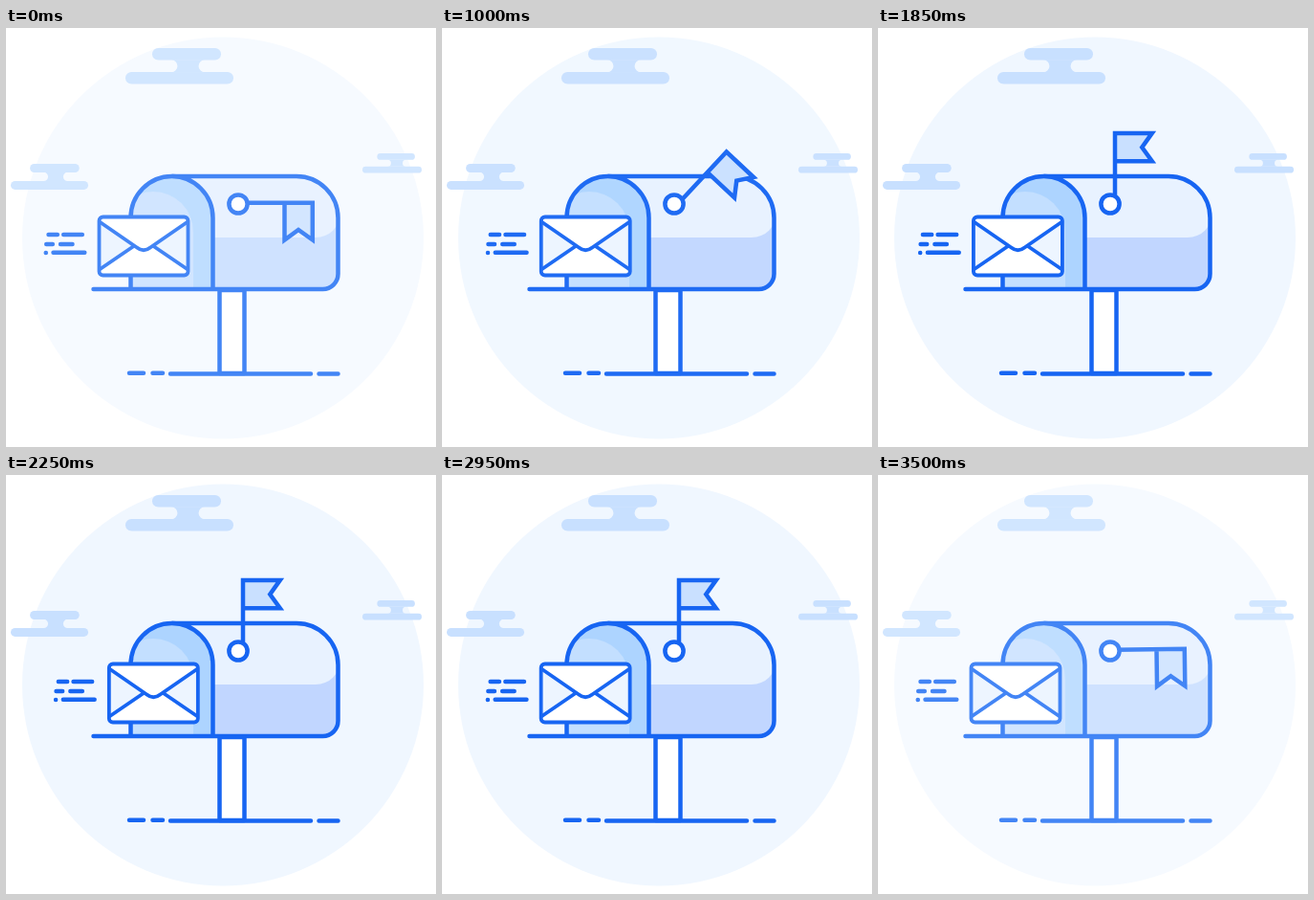
An HTML page for the animation above (3.55 s loop, 450 px wide and 438 px high).

```html
<!DOCTYPE html>
<html lang="en">
<head>
<meta charset="utf-8">
<title>Mailbox</title>
<style>
  html, body { margin: 0; width: 100%; height: 100%; overflow: hidden; background: #fff; }
  svg { display: block; width: 100%; height: 100%; }
  .line { fill: none; stroke: var(--line); stroke-width: 4.5; stroke-linecap: round; stroke-linejoin: round; }
  .paper { fill: #fff; }
  .sky { fill: var(--sky); }
  .cloud { fill: var(--cloud); }
  .shade { fill: var(--shade); }
  .light { fill: var(--light); }
  .rim { fill: var(--rim); }
  .inner { fill: var(--inner); }
  .cloth { fill: var(--cloth); }
  .side { fill: #edf5ff; }
</style>
</head>
<body>
<svg viewBox="0 0 450 438">
  <defs>
    <g id="cloud">
      <rect x="28" width="72" height="12.5" rx="6.25"/>
      <rect y="25" width="113" height="12.5" rx="6.25"/>
      <path d="M48 12.3a6.4 6.4 0 0 1 0 12.9h35a6.4 6.4 0 0 1 0-12.9z"/>
    </g>
    <path id="front" d="M130.5 273V198.5a43 43.5 0 0 1 86 0V273z"/>
    <path id="body" d="M174 155H304a43.5 43.5 0 0 1 43.5 43.5V257a16 16 0 0 1-16 16H216V198.5a43 43.5 0 0 0-42-43.5z"/>
    <clipPath id="frontClip"><use href="#front"/></clipPath>
    <clipPath id="bodyClip"><use href="#body"/></clipPath>
  </defs>

  <circle class="sky" cx="227" cy="219.5" r="210"/>
  <g class="cloud">
    <use href="#cloud" transform="translate(125 21)"/>
    <use href="#cloud" transform="translate(5 142) scale(.717)"/>
    <use href="#cloud" transform="translate(373 131) scale(.549)"/>
  </g>

  <path class="line" d="M129 360.8h15M153.500 360.800h10.500M172 361.500H319M327.500 361.500h20"/>
  <rect class="line paper" style="fill:#fff" x="223.500" y="274" width="26" height="87"/>

  <use href="#body" class="shade"/>
  <path class="light" clip-path="url(#bodyClip)" d="M170 150H350V193a26 26 0 0 1-26 26H170z"/>
  <use href="#front" class="rim"/>
  <path class="inner" clip-path="url(#frontClip)" d="M112 273V213a42 42 0 0 1 84 0V273z"/>
  <path class="line" d="M174 155H304a43.500 43.500 0 0 1 43.500 43.500V257a16 16 0 0 1-16 16H91.500M130.500 273V198.500a43 43.500 0 0 1 86 0V273"/>

  <g id="flag">
    <path class="line cloth" style="fill:var(--cloth);stroke-linejoin:miter;stroke-linecap:butt"
      d="M248 182.700H320.800V221.500L306 211L291.500 221.500V182.700"/>
  </g>
  <circle class="line" style="fill:#fff" cx="243" cy="184" r="9.600"/>

  <g id="mail">
    <path class="line" d="M44.500 216h9.300M60.200 216h19.600M42.200 226h6.600M57 226h12.500M41.700 235h.1M49.500 234.800h32.800"/>
    <rect class="paper" x="97.500" y="197.500" width="93" height="61" rx="4"/>
    <path class="side" d="M98 203L134 228L98 252zM190 203L154 228L190 252z"/>
    <g class="line" style="stroke-width:3.800">
      <rect x="97.500" y="197.500" width="93" height="61" rx="4"/>
      <path d="M98.500 203L137 229.500q7 5.500 14 0L189.500 203M98.500 252L133 228.500M189.500 252L155 228.500"/>
    </g>
  </g>
</svg>

<script>
  const LOOP = 3550, START = 795, SWING = 590, REACH = 23, RESET = 3175;
  const FLAG_TIME = 328, TINT_TIME = 250;

  // rest colour, active colour
  const tints = {
    line: ['#4385f5', '#1765f2'],
    sky: ['#f6faff', '#f0f7ff'],
    cloud: ['#d1e6ff', '#c8e0ff'],
    shade: ['#cfe2ff', '#c1d6ff'],
    light: ['#e9f2ff', '#e8f2ff'],
    rim: ['#bfdeff', '#add4ff'],
    inner: ['#d1e5ff', '#c3dfff'],
    cloth: ['#d3e6ff', '#c9e0ff']
  };
  const flag = document.getElementById('flag');
  const mail = document.getElementById('mail');
  const rootStyle = document.documentElement.style;

  const clamp = v => Math.min(1, Math.max(0, v));
  const channels = hex => [1, 3, 5].map(i => parseInt(hex.slice(i, i + 2), 16));
  const mix = ([from, to], k) => {
    const end = channels(to);
    return `rgb(${channels(from).map((c, i) => Math.round(c + (end[i] - c) * k))})`;
  };
  // rises after START and falls again after RESET
  const level = (t, span, power) =>
    clamp((t - START) / span) ** power - clamp((t - RESET) / span) ** power;

  function mailShift(t) {
    const swings = Math.min(4, Math.max(0, (t - START) / SWING));
    return REACH * (1 - Math.cos(Math.PI * swings)) / 2;
  }

  function draw(t) {
    const tint = level(t, TINT_TIME, 1);
    for (const name in tints) rootStyle.setProperty('--' + name, mix(tints[name], tint));
    flag.setAttribute('transform', `rotate(${-90 * level(t, FLAG_TIME, 1.4)} 248 182.7)`);
    mail.setAttribute('transform', `translate(${mailShift(t)} 0)`);
  }

  const begin = performance.now();
  function tick() {
    draw((performance.now() - begin) % LOOP);
    requestAnimationFrame(tick);
  }
  draw(0);
  requestAnimationFrame(tick);
</script>
</body>
</html>
```
